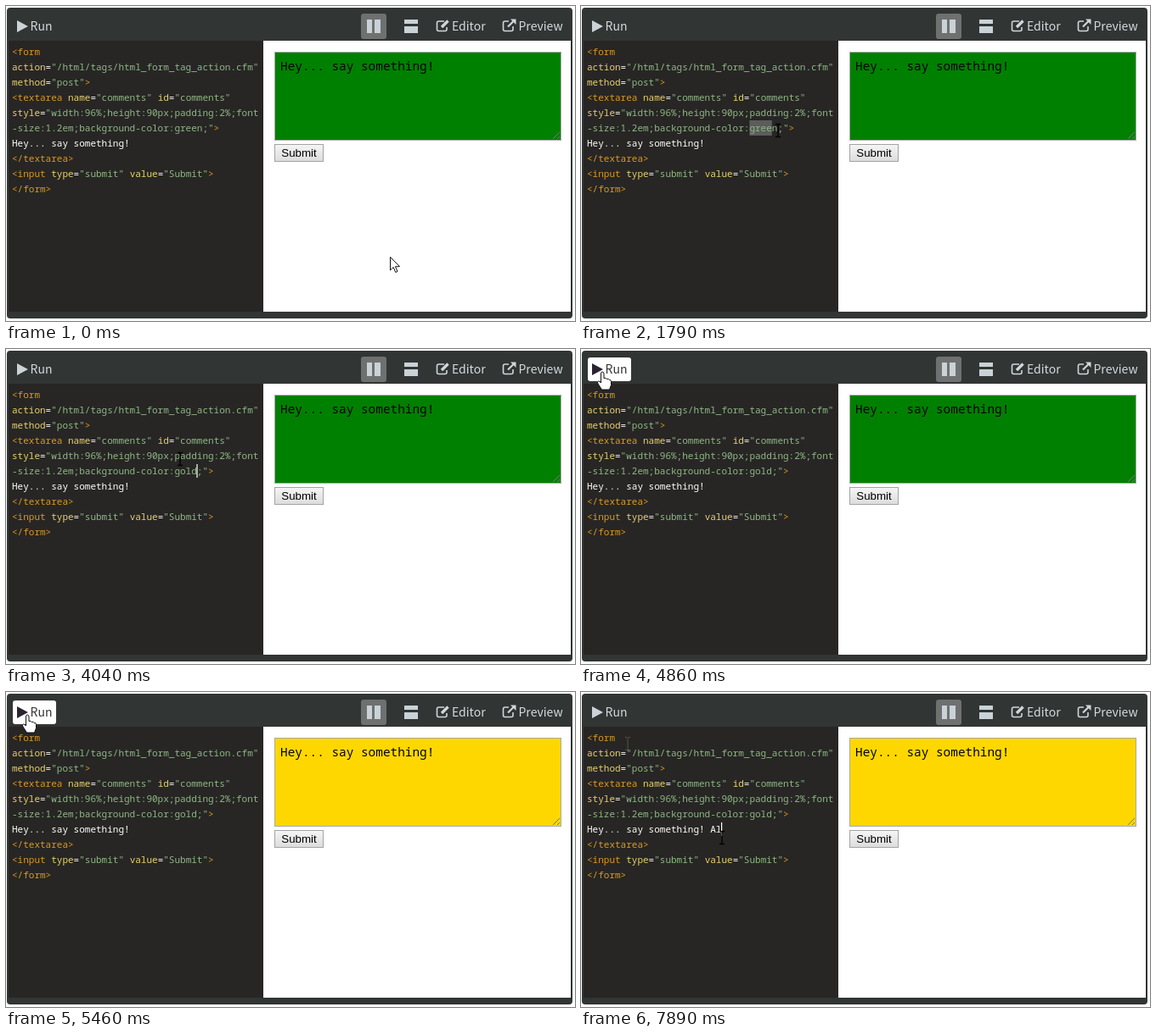
These frames come from a looping animation (670x372 px, 8 s). An HTML page:

```html
<!DOCTYPE html>
<html lang="en">
<head>
<meta charset="utf-8">
<title>Code playground</title>
<style>
html, body { margin: 0; width: 100%; height: 100%; overflow: hidden; background: #fff; }
svg { display: block; width: 670px; height: 372px; }
text { white-space: pre; }
.code { font: 11px "Noto Sans Mono", monospace; fill: #fff; }
.tag { fill: #dc981f; }
.attr { fill: #e8d06c; }
.str { fill: #8fb783; }
.bar { font: 300 14px "Noto Sans CJK JP", "Noto Sans CJK SC", "Noto Sans CJK", "Open Sans", sans-serif; fill: #d5dbde; }
.area { font: 14.4px "Noto Sans Mono", monospace; }
.btn { font: 13.33px "Liberation Sans", Arial, sans-serif; }
</style>
</head>
<body>
<svg viewBox="0 0 670 372" xmlns="http://www.w3.org/2000/svg">
  <defs>
    <linearGradient id="face" x2="0" y2="1">
      <stop stop-color="#f5f5f5"/><stop offset="1" stop-color="#dcdcdc"/>
    </linearGradient>
    <path id="ibeam" d="M-3 -7.5H-1L0 -6.5L1 -7.5H3M0 -6.5V6.5M-3 7.5H-1L0 6.5L1 7.5H3" fill="none"/>
  </defs>
  <rect x="1" y="2" width="666" height="367" rx="4" fill="#313534"/>
  <rect x="3" y="41" width="300" height="320" fill="#272625"/>
  <rect x="303" y="41" width="362" height="320" fill="#fff"/>

  <rect id="hover" x="8" y="10" width="51" height="28" rx="3" fill="#fff"/>
  <path id="play" d="M13 17L26 24L13 31Z"/>
  <text id="run" class="bar" x="28.5" y="29">Run</text>
  <rect x="418" y="9" width="30" height="30" rx="3" fill="#6f7070"/>
  <path d="M425 16h6v16h-6zM434 16h7v16h-7zM469 16h16v5h-16zM469 24h16v8h-16z" fill="#c9d2d7"/>
  <g fill="none" stroke="#d0d7da" stroke-width="1.6">
    <path d="M516 18H509.5Q507.5 18 507.5 20V27.500Q507.5 29.500 509.5 29.500H517Q519 29.500 519 27.500V25"/>
    <path d="M513 25L520.500 17.500" stroke-width="3.400"/>
    <path d="M592 18H587.5Q585.5 18 585.5 20V27.500Q585.5 29.500 587.5 29.500H595Q597 29.500 597 27.500V24"/>
    <path d="M591 24.500L598 17.500" stroke-width="2.200"/>
  </g>
  <path d="M594 15.500H600.500V22Z" fill="#d0d7da"/>
  <text class="bar" x="525" y="29">Editor</text>
  <text class="bar" x="603.5" y="29">Preview</text>

  <rect id="sel" x="198.400" y="135" height="18" fill="#5c5d5b"/>
  <g id="code" class="code"></g>
  <rect id="caret" width="1.200" height="16" fill="#fff"/>
  <use id="trace" href="#ibeam" x="55" y="61" stroke="#55544a"/>

  <g id="page">
    <rect id="box" x="316.500" y="54.500" width="337" height="104" stroke="#a9a9a9"/>
    <path d="M644 157L652 149M649 157L652 154" stroke="#777" fill="none"/>
    <text class="area" x="323" y="76">Hey... say something!</text>
    <rect x="316.500" y="163.500" width="57" height="20" fill="url(#face)" stroke="#a3a3a3"/>
    <text class="btn" x="345" y="178" text-anchor="middle">Submit</text>
  </g>

  <g id="mouse">
    <path id="arrow" d="M.5 .5V16L4.200 12.500L6.700 18.500L9 17.500L6.500 11.700H11.500Z" fill="#fff" stroke="#111" stroke-width="1"/>
    <use id="beam" href="#ibeam" stroke="#000" stroke-width="1.300"/>
    <path id="hand" d="M-2.500 1Q-2.500 -1 -.8 -1T1 1V6.500Q3.500 5.500 4.200 7.500Q6.500 6.500 7.200 8.500Q9.500 8 9.500 10.500V14.500L7.500 20H-1.500L-6 13Q-7.500 10.500 -5.500 10Q-4 10 -2.500 12Z" fill="#fff" stroke="#111"/>
  </g>
</svg>
<script>
const $ = id => document.getElementById(id);
const LOOP = 8000, LEFT = 7, CHAR = 6.6, COLOR_COL = 29;

const span = (cls, text) => `<tspan class="${cls}">${text.replace(/</g, "&lt;")}</tspan>`;
const tag = s => span("tag", s);
const str = s => span("str", s);
const attr = (name, value) => span("attr", name) + "=" + str(value);

const lines = [
  tag("<form"),
  attr("action", '"/html/tags/html_form_tag_action.cfm"'),
  attr("method", '"post"') + tag(">"),
  tag("<textarea ") + attr("name", '"comments"') + " " + attr("id", '"comments"'),
  attr("style", '"width:96%;height:90px;padding:2%;font'),
  str("-size:1.2em;background-color:") + '<tspan id="color" class="str"></tspan>' + str(';"') + tag(">"),
  'Hey... say something!<tspan id="extra"></tspan>',
  tag("</textarea>"),
  tag("<input ") + attr("type", '"submit"') + " " + attr("value", '"Submit"') + tag(">"),
  tag("</form>")
];
$("code").innerHTML = lines
  .map((s, i) => `<text x="${LEFT}" y="${58 + 18 * i}">${s}</text>`).join("");

// Each track holds [start, ...values]; the latest started entry applies.
const tracks = {
  mouse: [
    [0, "arrow", 452, 296], [200, "arrow", 425, 278], [390, "arrow", 325, 215],
    [580, "beam", 218, 152], [770, "beam", 202, 148],
    [1170, "beam", 208, 148], [1380, "beam", 216, 148], [1580, "beam", 224, 147],
    [1790, "beam", 232, 147], [2200, "beam", 234.5, 147],
    [4040, "beam", 205, 130], [4245, "beam", 128, 94], [4450, "beam", 55, 61],
    [4655, "hand", 30, 31], [4860, "hand", 26, 28],
    [6060, "beam", 55, 61], [6264, "beam", 88, 98], [6468, "beam", 126, 136],
    [6672, "beam", 153, 162], [6876, "beam", 166, 172]
  ],
  selected: [[0, 0], [1170, 1], [1380, 2], [1580, 3], [1790, 4], [2200, 5], [2820, 0]],
  color: [[0, "green"], [2820, "g"], [3220, "go"], [3420, "gol"], [3630, "gold"]],
  extra: [[0, ""], [7300, " "], [7500, " A"], [7890, " Al"]],
  fill: [[0, "#008000"], [5270, ""], [5460, "#ffd700"]]
};
const at = (name, t) => tracks[name].findLast(e => e[0] <= t).slice(1);
const show = (id, on) => $(id).setAttribute("visibility", on ? "visible" : "hidden");

function putCaret(col, row) {
  $("caret").setAttribute("x", LEFT + CHAR * col - .4);
  $("caret").setAttribute("y", 46 + 18 * row);
}

function draw(t) {
  const [kind, x, y] = at("mouse", t);
  const [color] = at("color", t), [extra] = at("extra", t), [fill] = at("fill", t);
  $("mouse").setAttribute("transform", `translate(${x} ${y})`);
  for (const k of ["arrow", "beam", "hand"]) show(k, k === kind);

  const hot = kind === "hand";
  show("hover", hot);
  $("play").setAttribute("fill", hot ? "#2b2233" : "#ccd3d6");
  $("run").style.fill = hot ? "#333" : "";

  $("sel").setAttribute("width", CHAR * at("selected", t)[0]);
  $("color").textContent = color;
  $("extra").textContent = extra;
  if (t < 7080) putCaret(COLOR_COL + color.length, 5);
  else putCaret(21 + extra.length, 6);
  show("caret", t >= 2820 && t < 4655 || t >= 7080);
  show("trace", t >= 6264);

  show("page", fill);
  $("box").setAttribute("fill", fill || "#fff");
}

function tick() {
  draw(performance.now() % LOOP);
  requestAnimationFrame(tick);
}
tick();
</script>
</body>
</html>
```
